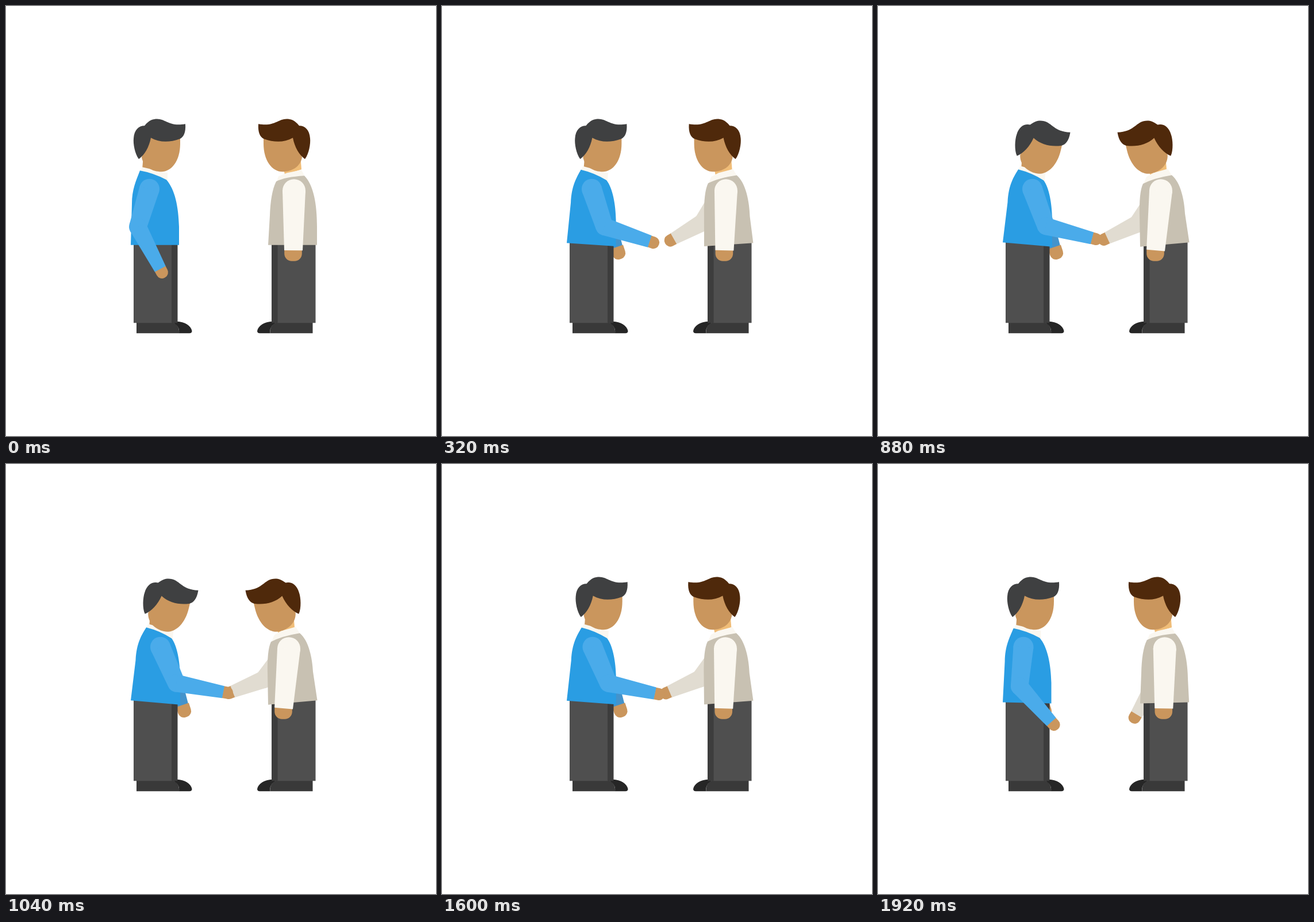
Recreate the animation shown at these times as an HTML page with a canvas. Size 748 px wide and 748 px high, loop 2 s.

```html
<!DOCTYPE html>
<html lang="en">
<head>
<meta charset="utf-8">
<title>Handshake</title>
<style>
  html, body { margin: 0; width: 100%; height: 100%; overflow: hidden; background: #fff; }
  canvas { display: block; width: 748px; height: 748px; }
</style>
</head>
<body>
<canvas id="stage" width="748" height="748"></canvas>
<script>
const ctx = document.getElementById('stage').getContext('2d');
const LOOP = 2000, STEP = 80, REACH_TIME = 600, NOD_PEAK = 1080;
const SKIN = '#ca965d', CREAM = '#faf7f0';

const clamp = v => Math.min(1, Math.max(0, v));
const smooth = v => v * v * (3 - 2 * v);
const rad = deg => deg * Math.PI / 180;

function fill(path, color) {
  ctx.fillStyle = color;
  ctx.fill(new Path2D(path));
}

// "a~b" in a path blends from upright to leaning
function bend(path, lean, color) {
  fill(path.replace(/([\d.]+)~([\d.]+)/g, (_, a, b) => +a + (b - a) * lean), color);
}

function mirrored(sum, draw) {
  ctx.save();
  ctx.translate(sum, 0);
  ctx.scale(-1, 1);
  draw();
  ctx.restore();
}

// Tapered sleeve through [x, y, radius] joints, flat at the cuff
function sleeve(joints, color) {
  ctx.fillStyle = color;
  for (let i = 0; i < joints.length - 1; i++) {
    const [x, y, r] = joints[i], [X, Y, R] = joints[i + 1];
    const a = Math.atan2(Y - y, X - x), nx = -Math.sin(a), ny = Math.cos(a);
    ctx.beginPath();
    ctx.arc(x, y, r, 0, 7);
    ctx.fill();
    ctx.beginPath();
    ctx.moveTo(x + nx * r, y + ny * r);
    ctx.lineTo(X + nx * R, Y + ny * R);
    ctx.lineTo(X - nx * R, Y - ny * R);
    ctx.lineTo(x - nx * r, y - ny * r);
    ctx.fill();
  }
}

function hand(x, y, angle, half, length, round) {
  ctx.save();
  ctx.translate(x, y);
  ctx.rotate(angle);
  ctx.fillStyle = SKIN;
  ctx.beginPath();
  ctx.roundRect(-0.5, -half, length + 0.5, half * 2, [0, round, round, 0]);
  ctx.fill();
  ctx.restore();
}

// Two bones; angles in degrees from hanging straight down, positive to the right
function arm(x, y, upper, upperLen, fore, foreLen, radius, color) {
  const a = rad(upper), b = rad(fore);
  const ex = x + Math.sin(a) * upperLen, ey = y + Math.cos(a) * upperLen;
  const wx = ex + Math.sin(b) * foreLen, wy = ey + Math.cos(b) * foreLen;
  hand(wx, wy, Math.PI / 2 - b, 10.5, 17, 10);
  sleeve([[x, y, radius], [ex, ey, 15.3], [wx, wy, 10.7]], color);
}

function legs() {
  fill('M227 551H290Q302 556 301 570H227Z', '#393939');
  fill('M297 549.5C311 550 322 557 323.5 566Q323.5 570 319 570H301C302 562 299 556 290 551Z', '#262626');
  fill('M222 406H289V552H222Z', '#4f4f4f');
  fill('M288 406H298.5V552H288Z', '#3d3d3d');
}

function neck(shift, color) {
  ctx.save();
  ctx.translate(shift, 0);
  fill('M239 260L237 285L266 294L272 265Z', color);
  ctx.restore();
}

function head(shift, nod, hair) {
  ctx.save();
  ctx.translate(shift + 243, 260 - nod * 2.5);
  ctx.rotate(nod * 0.23);
  ctx.translate(-243, -260);
  fill('M246 222H303V240C303 270 288 289 270 289C255 289 239 281 236 264Z', SKIN);
  fill('M312 206C313 221 309 229 302 232C285 238 268 239 252 230C249 246 241 260 231 267' +
    'C224 258 221 240 222 231C223 216 231 209 241 209C249 199 256 197.3 263 197.3C278 197.5 284 211 312 206Z', hair);
  ctx.restore();
}

function vestMan(reach, nod, drop) {
  const shift = 12 * reach, topX = 501 - 9 * reach, cuffX = 500 - 11 * reach - 6 * nod;
  arm(487, 325 + 4 * drop, 5 - 48 * reach + 8 * drop, 62, -17 - 56 * reach + 8 * drop, 58, 17, '#e1dcd1');
  mirrored(760.5, legs);
  mirrored(751, () => neck(shift, '#f0bd78'));
  bend('M489~479 291~291L514~504 286~284L520~512 298~297L470~461 309~312L474~467 297~298Z', reach, CREAM);
  mirrored(751, () => head(shift, nod, '#4f290b'));
  bend('M470~461 306~310Q485~480 298~300 519~511 296~295C535~527 312~308 541~533 345~340 541~534 385~362' +
    'L541~541.5 416.5~412L456~456 416.5~419.5L459~455 365~365C460~454.5 340~340 463~456 320~320 470~461 306~310Z',
    reach, '#c8c1b2');
  hand(cuffX - 0.5, 425, Math.PI / 2, 15.3, 19.5, 13);
  sleeve([[topX, 322, 20], [cuffX, 426, 16]], CREAM);
}

function sweaterMan(reach, nod, drop) {
  const shift = 12 * reach, farX = 282 + 32 * reach - 4 * nod;
  sleeve([[farX - 15, 385, 13], [farX - 3, 421, 10.5]], '#4393cc');
  hand(farX - 3, 420.5, 1.25, 11.7, 21.5, 10.5);
  legs();
  neck(shift, SKIN);
  bend('M237~247.5 281~279L281~291 291~291L281~290 305~306L233~243 290~288Z', reach, CREAM);
  head(shift, nod, '#3f4041');
  bend('M233~244 287~285Q256~268 291~291 279~288 303~304C294~298 320~317 300~302.5 350~345 301~303 385~370' +
    'L301~303 416.5~419.5L217~217 416.5~412L219~225.5 345~342C219~227 320~312 226~236 305~298 233~244 287~285Z',
    reach, '#2a9de3');
  arm(249.5 + 14 * reach + 5 * nod, 319, -17 + 45.5 * reach - 8.5 * drop, 69,
    28 + 56 * reach - 8.5 * drop, 83, 17.5, '#4aabea');
}

function draw(time) {
  // Out quickly, settling into the clasp; the way back is the same in reverse
  const reach = 1 - (1 - clamp(Math.min(time, LOOP - time) / REACH_TIME)) ** 2;
  const away = time - NOD_PEAK;
  const nod = smooth(clamp((480 - Math.abs(away)) / 240));
  const drop = nod * (0.75 - 0.25 * Math.cos(Math.PI * away / 200));
  ctx.fillStyle = '#fff';
  ctx.fillRect(0, 0, 748, 748);
  ctx.save();
  ctx.translate(0, -0.8);
  vestMan(reach, nod, drop);
  sweaterMan(reach, nod, drop);
  ctx.restore();
}

function frame(now) {
  draw(Math.floor(now % LOOP / STEP) * STEP);
  requestAnimationFrame(frame);
}
draw(0);
requestAnimationFrame(frame);
</script>
</body>
</html>
```
